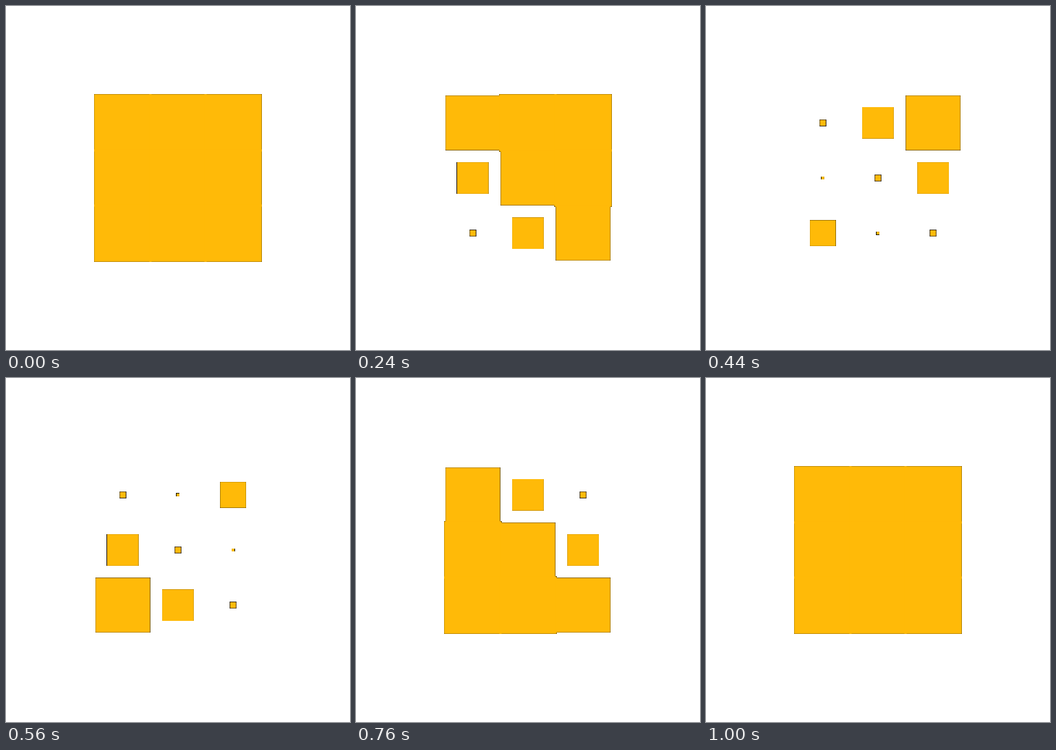
Animation, 500 px wide and 500 px high, one loop 2020 ms. Source, as an HTML page:

```html
<!DOCTYPE html>
<html lang="en">
<head>
<meta charset="utf-8">
<title>Cube grid loader</title>
<style>
  html, body { margin: 0; width: 100%; height: 100%; overflow: hidden; background: #fff; }
  svg { display: block; width: 100%; height: 100%; }
</style>
</head>
<body>
<svg viewBox="0 0 500 500">
  <g id="rims" fill="#000" shape-rendering="crispEdges"></g>
  <g id="fills" fill="#ffba08"></g>
</svg>
<script>
const LOOP = 2020, ACTIVE = 1000, STEP = 20;
const DIP = 300, STAGGER = 100;
const CENTER_X = 249.95, CENTER_Y = 250, PITCH = 80.1, HALF = 250 / 6;
const MIN_COVER = 0.06;

function addRect(id) {
  const rect = document.createElementNS('http://www.w3.org/2000/svg', 'rect');
  return document.getElementById(id).appendChild(rect);
}

// The wave runs from the bottom left cell to the top right one.
const cells = Array.from({ length: 9 }, (_, i) => {
  const col = i % 3, row = Math.floor(i / 3);
  return {
    x: CENTER_X + PITCH * (col - 1),
    y: CENTER_Y + PITCH * (row - 1),
    center: DIP + STAGGER * (col + 2 - row),
    rim: addRect('rims'),
    fill: addRect('fills')
  };
});

function place(rect, left, top, right, bottom) {
  rect.setAttribute('x', left);
  rect.setAttribute('y', top);
  rect.setAttribute('width', right - left);
  rect.setAttribute('height', bottom - top);
}

const smooth = p => p * p * (3 - 2 * p);
const snapDown = v => Math.floor(v + MIN_COVER);
const snapUp = v => Math.ceil(v - MIN_COVER);

function render(ms) {
  const t = Math.min(ACTIVE, Math.floor((ms % LOOP) / STEP) * STEP);
  for (const { x, y, center, rim, fill } of cells) {
    const half = HALF * smooth(Math.min(1, Math.abs(t - center) / DIP));
    const left = x - half, right = x + half;
    const top = y - half, bottom = y + half;
    // Partly covered border pixels blend with black instead of white.
    rim.setAttribute('visibility', half ? 'visible' : 'hidden');
    place(rim, snapDown(left), snapDown(top), snapUp(right), snapUp(bottom));
    place(fill, left, top, right, bottom);
  }
}

const start = performance.now();
function tick() {
  render(performance.now() - start);
  requestAnimationFrame(tick);
}
tick();
</script>
</body>
</html>
```
